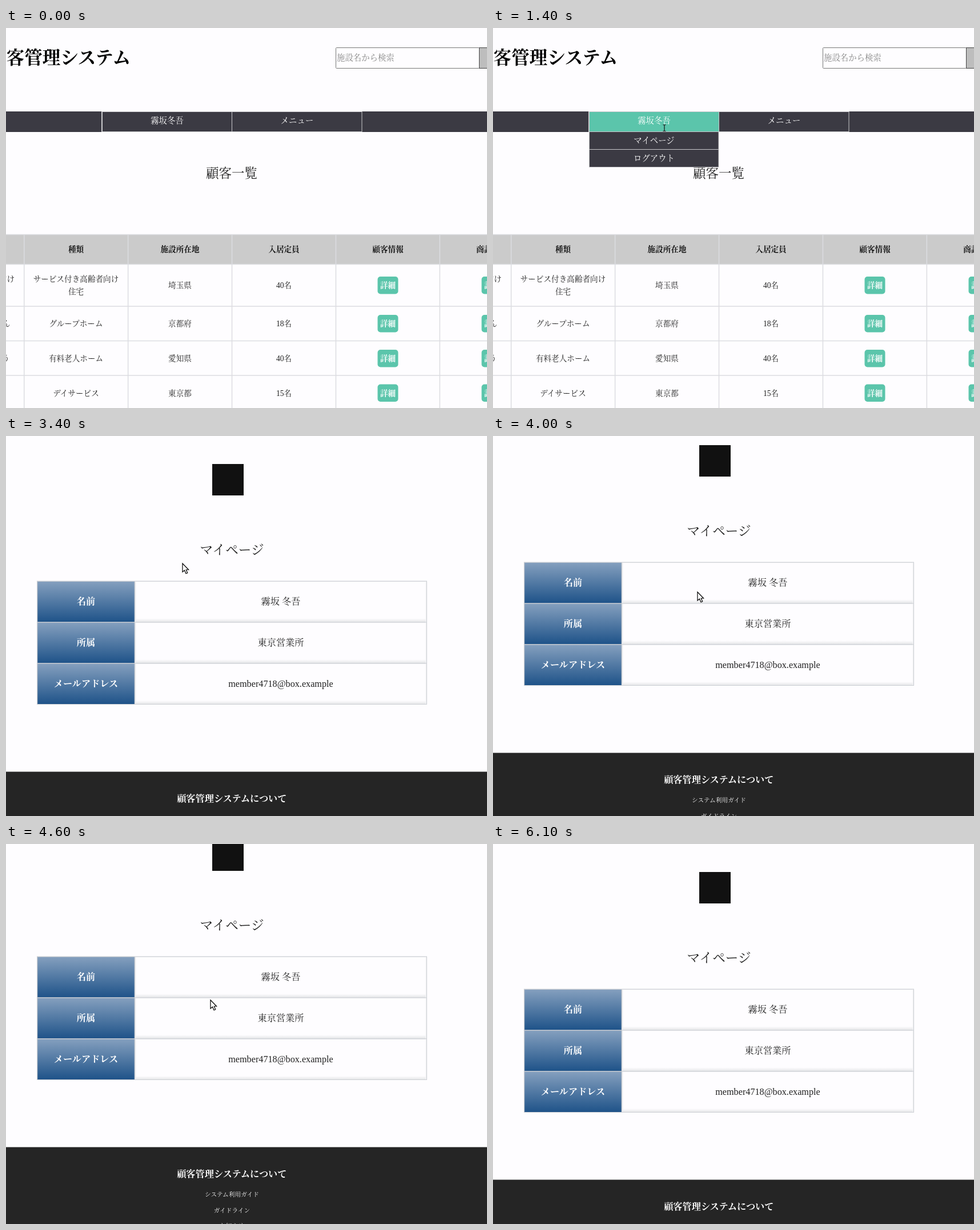
An HTML page for the animation above (6.2 s loop, 842x665 px).

```html
<!DOCTYPE html>
<html lang="ja">
<head>
<meta charset="utf-8">
<title>顧客管理システム</title>
<style>
  html, body { margin: 0; width: 100%; height: 100%; overflow: hidden; background: #fefdff; }
  svg { display: block; width: 842px; height: 665px; }
  text { font-family: "Liberation Serif", "Noto Serif CJK JP", "Noto Serif JP", "Noto Sans CJK JP", "Noto Sans CJK", serif; }
</style>
</head>
<body>
<svg id="stage" viewBox="0 0 842 665" xmlns="http://www.w3.org/2000/svg">
  <defs>
    <linearGradient id="blue" x1="0" y1="0" x2="0" y2="1">
      <stop offset="0" stop-color="#849fbe"/>
      <stop offset="1" stop-color="#1f5389"/>
    </linearGradient>
    <linearGradient id="shade" x1="0" y1="0" x2="0" y2="1">
      <stop offset="0" stop-color="#fefdff"/>
      <stop offset="1" stop-color="#e6e7e9"/>
    </linearGradient>
  </defs>
  <rect width="842" height="665" fill="#fefdff"/>
  <g id="list"></g>
  <g id="menu"></g>
  <g id="profile"></g>
  <g id="cursor">
    <path id="arrow" d="M0 0V15L3.5 12L6 17.8L8.7 16.7L6.3 11H10.6Z" fill="#fff" stroke="#000" stroke-width="1.2"/>
    <path id="beam" d="M-2.5 -5.5H-.8L0 -5L.8 -5.5H2.5M0 -5V5M-2.5 5.5H-.8L0 5L.8 5.5H2.5" fill="none" stroke="#111" stroke-width="1.2"/>
    <path id="hand" d="M-1.5 1.5Q0 -1 1.5 1.5V8L9 9.5Q10.5 10 10.5 12V16L8.5 21H0L-5 13Q-5 10.5 -1.5 13Z" fill="#fff" stroke="#000" stroke-width="1.1"/>
  </g>
</svg>
<script>
const NS = "http://www.w3.org/2000/svg";
const $ = id => document.getElementById(id);
const PAPER = "#fefdff", DARK = "#3b3a43", TEAL = "#5bc5ab", LINE = "#dcdde1", INK = "#222";

function add(parent, tag, attrs) {
  const el = document.createElementNS(NS, tag);
  for (const k in attrs) el.setAttribute(k, attrs[k]);
  parent.appendChild(el);
  return el;
}
function box(parent, x, y, width, height, fill, more) {
  return add(parent, "rect", { x, y, width, height, fill, ...more });
}
// Text placed by the vertical middle of its characters
function label(parent, str, x, mid, size, fill = INK, more = {}) {
  const el = add(parent, "text", {
    x, y: mid + size * 0.38, "font-size": size, fill, "text-anchor": "middle", ...more
  });
  el.textContent = str;
  return el;
}
const BOLD = { "font-weight": 700 };
const START = { "text-anchor": "start" };
const END = { "text-anchor": "end" };
const EDGE = { stroke: "#c9c9cc" };

function buildList(g) {
  label(g, "客管理システム", 218, 51, 31.5, "#000", { ...BOLD, ...END });
  box(g, 577.5, 34.5, 251, 36, PAPER, { stroke: "#777", rx: 1 });
  label(g, "施設名から検索", 579, 52, 14.4, "#858585", START);
  box(g, 828.5, 34.5, 30, 36, "#bdbdbd", { stroke: "#444" });

  box(g, 0, 146, 842, 36, DARK);
  for (const x of [168, 396]) box(g, x - 0.5, 146.5, 227.5, 35, "none", EDGE);
  label(g, "メニュー", 509.5, 162, 14.4, "#fff");

  label(g, "顧客一覧", 395, 253, 22.5);

  box(g, 0, 361, 842, 53, "#cbcbcb");
  for (const y of [361.5, 413.5, 487, 547.5, 608]) box(g, 0, y - 0.75, 842, 1.5, LINE);
  for (let i = 0; i < 5; i++) box(g, 31 + i * 181.9, 361, 1.5, 304, LINE);

  const col = i => 122.5 + i * 182;
  ["種類", "施設所在地", "入居定員", "顧客情報", "商談情報"]
    .forEach((s, i) => label(g, s, col(i), 387, 13.6, "#111", BOLD));

  const rows = [
    [450, "", "埼玉県", "40名"],
    [517, "グループホーム", "京都府", "18名"],
    [578, "有料老人ホーム", "愛知県", "40名"],
    [638.5, "デイサービス", "東京都", "15名"]
  ];
  label(g, "サービス付き高齢者向け", col(0), 439, 13.6);
  label(g, "住宅", col(0), 461, 13.6);
  for (const [y, ...cells] of rows) {
    cells.forEach((s, i) => label(g, s, col(i), y, 13.6));
    for (const i of [3, 4]) {
      box(g, col(i) - 18, y - 15, 36, 30.5, TEAL, { rx: 5 });
      label(g, "詳細", col(i), y, 13.6, "#fff", BOLD);
    }
  }
  label(g, "向け", 15, 439, 13.6, INK, END);
  label(g, "ん", 7, 517, 13.6, INK, END);
  label(g, "う", 6, 578, 13.6, INK, END);
  label(g, "イ", 1.5, 638.5, 13.6, INK, END);
}

function buildMenu(g) {
  const top = box(g, 168.5, 146.5, 227, 35, DARK, EDGE);
  label(g, "霧坂冬吾", 282, 162, 14.4, "#fff");
  const drop = add(g, "g", {});
  const item = box(drop, 168.5, 181.5, 226.5, 31, DARK, EDGE);
  box(drop, 168.5, 212.5, 226.5, 31, DARK, EDGE);
  label(drop, "マイページ", 282, 196.5, 14.4, "#fff");
  label(drop, "ログアウト", 282, 228, 14.4, "#fff");
  return { top, drop, item };
}

function buildProfile(g) {
  box(g, 361, 49, 55, 55, "#111");
  label(g, "マイページ", 395.5, 198.5, 22.6);
  box(g, 54, 253.5, 683, 216.5, "#cbced3");
  const rows = [
    ["名前", "霧坂 冬吾"],
    ["所属", "東京営業所"],
    ["メールアドレス", "member4718@box.example"]
  ];
  rows.forEach(([key, value], i) => {
    const y = 254.8 + i * 71.9, mid = y + 34.5;
    box(g, 55.3, y, 169.4, 70.4, "url(#blue)");
    box(g, 226, y, 510, 70.4, PAPER);
    box(g, 226, y + 64.4, 510, 6, "url(#shade)");
    box(g, 226, y, 1.5, 70.4, "#eeeff1");
    box(g, 734.5, y, 1.5, 70.4, "#f0f1f3");
    label(g, key, 140, mid, 16.2, "#fff", BOLD);
    label(g, value, 481, mid, 16.2);
  });
  box(g, 0, 587.5, 842, 240, "#252525");
  label(g, "顧客管理システムについて", 395.3, 634.2, 16.2, "#fff", BOLD);
  label(g, "システム利用ガイド", 395.5, 670, 10.7, "#fff");
  label(g, "ガイドライン", 395.5, 697.5, 10.7, "#fff");
  label(g, "お知らせ", 395.5, 724.5, 10.7, "#fff");
  label(g, "© HoshiNagi Co., Ltd. All Rights Reserved.", 395, 755, 13, "#fff");
}

// Pointer path: time, x, y
const PATH = [
  [500, 850, 430], [1200, 302, 178], [1400, 300, 175], [1900, 300, 175],
  [2300, 298, 203], [2500, 298, 203], [2700, 292, 205], [3200, 292, 205],
  [3800, 358, 273], [4800, 358, 273], [5300, 249, 111], [5600, 172, -22]
];
function pointer(t) {
  if (t <= PATH[0][0]) return PATH[0].slice(1);
  for (let i = 1; i < PATH.length; i++) {
    const [t0, x0, y0] = PATH[i - 1], [t1, x1, y1] = PATH[i];
    if (t <= t1) {
      const p = (t - t0) / (t1 - t0), e = p * p * (3 - 2 * p);
      return [x0 + (x1 - x0) * e, y0 + (y1 - y0) * e];
    }
  }
  return PATH[PATH.length - 1].slice(1);
}

const easeOut = p => 1 - Math.pow(1 - Math.min(1, Math.max(0, p)), 2.05);
const scrollAt = t => Math.round(90 * (easeOut((t - 3900) / 500) - easeOut((t - 4500) / 500)));
const show = (el, on) => el.setAttribute("display", on ? "inline" : "none");

buildList($("list"));
const menu = buildMenu($("menu"));
buildProfile($("profile"));

function draw(t) {
  const onList = t < 3000, open = t >= 1200 && t < 2900;
  const [x, y] = pointer(t);
  show($("list"), onList);
  show($("menu"), onList);
  show($("profile"), !onList);
  show(menu.drop, open);
  menu.top.setAttribute("fill", open ? TEAL : DARK);
  const onItem = open && y > 182;
  menu.item.setAttribute("fill", onItem ? TEAL : DARK);
  $("profile").setAttribute("transform", `translate(0 ${-scrollAt(t)})`);

  const hand = onItem && t < 2700, beam = open && !onItem;
  show($("hand"), hand);
  show($("beam"), beam);
  show($("arrow"), !hand && !beam);
  $("cursor").setAttribute("transform", `translate(${Math.round(x)} ${Math.round(y)})`);
}

const LOOP = 6200, STEP = 100;
const begin = performance.now();
function tick() {
  const t = (performance.now() - begin) % LOOP;
  draw(Math.floor(t / STEP) * STEP);
  requestAnimationFrame(tick);
}
draw(0);
requestAnimationFrame(tick);
</script>
</body>
</html>
```
